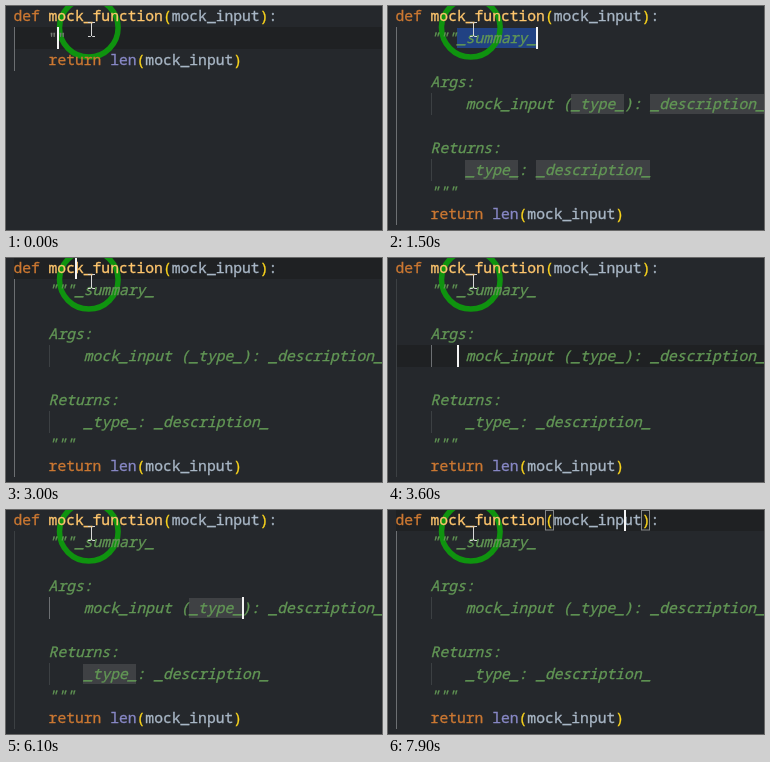
Write an HTML page that moves like this. It is 376 by 224 pixels and loops after 8 s.

```html
<!DOCTYPE html>
<html lang="en">
<head>
<meta charset="utf-8">
<title>Docstring editing</title>
<style>
  html, body { margin: 0; width: 100%; height: 100%; overflow: hidden; background: #25282c; }
  svg { display: block; width: 376px; height: 224px; }
  text { font: 14.667px "Noto Sans Mono", "DejaVu Sans Mono", monospace; white-space: pre; color: #a9b7c6; }
  text, tspan { fill: currentColor; stroke: currentColor; stroke-width: .3px; }
  .key { color: #cc7832; }
  .fn { color: #ffc66d; }
  .paren { color: #fad41c; }
  .builtin { color: #8888c6; }
  .doc { color: #629755; font-style: italic; }
  .quote { color: #747b72; }
  .guide { fill: #3c4043; }
  .guide.active { fill: #6c6f72; }
  .mark { fill: #7c7c7c; fill-opacity: .3; }
  .selected { fill: #214283; }
  .bracket { fill: none; stroke: #85888a; }
</style>
</head>
<body>
<svg id="stage" viewBox="0 0 376 224">
  <rect id="band" x="8" width="368" height="22" fill="#1f2123"/>
  <g id="marks"></g>
  <circle cx="82.8" cy="21.8" r="29.3" fill="none" stroke="#0f930f" stroke-width="5.5"/>
  <g id="header"></g>
  <g id="short"></g>
  <g id="full"></g>
  <text id="quotes" class="quote" x="42.6" y="36.5"></text>
  <g id="popup">
    <rect x="45.5" y="43.5" width="340" height="23" fill="#2b2d30" stroke="#45484b"/>
    <rect x="46" y="44" width="330" height="22" fill="#263a52"/>
    <path d="M52 50h10v10h-10z" fill="none" stroke="#a9b7c6" stroke-dasharray="2 1"/>
    <text x="69" y="59.5">Generate Docstring</text>
  </g>
  <rect id="caret" width="2" height="22" fill="#f4f4f4"/>
  <path d="M82 16.5h2.5l1 1 1-1H89M85.5 17v13M82 30.5h2.5l1-1 1 1H89" fill="none" stroke="#d8d8d8"/>
</svg>
<script>
const LOOP = 8000, LEFT = 7.4, CELL = 8.8, ROW = 22;
const $ = id => document.getElementById(id);
const xAt = col => LEFT + col * CELL;
const topAt = line => line * ROW - 1;

function add(parent, tag, attrs, content = '') {
  const node = document.createElementNS('http://www.w3.org/2000/svg', tag);
  for (const key in attrs) node.setAttribute(key, attrs[key]);
  node.textContent = content;
  parent.append(node);
  return node;
}

function write(parent, line, col, ...tokens) {
  const text = add(parent, 'text', { x: xAt(col), y: line * ROW + 14.5 });
  for (const [content, cls = ''] of tokens) add(text, 'tspan', { class: cls }, content);
}

const writeReturn = (parent, line) => write(parent, line, 4,
  ['return ', 'key'], ['len', 'builtin'], ['(', 'paren'], ['mock_input'], [')', 'paren']);

const guide = (parent, col, line, count) => add(parent, 'rect',
  { class: 'guide', x: Math.ceil(xAt(col)), y: topAt(line), width: 1, height: count * ROW });

function box(group, cls, line, col, length) {
  const inset = cls === 'bracket' ? .5 : 0;
  add(group, 'rect', {
    class: cls, x: Math.floor(xAt(col)) + inset, y: topAt(line) + inset + 1,
    width: Math.round(length * CELL) - inset * 2, height: ROW - 2 - inset
  });
}

write($('header'), 0, 0, ['def ', 'key'], ['mock_function', 'fn'], ['(', 'paren'],
  ['mock_input'], [')', 'paren'], [':']);

guide($('short'), 0, 1, 2).classList.add('active');
writeReturn($('short'), 2);

const full = $('full');
const bodyGuide = guide(full, 0, 1, 9);
const argsGuide = guide(full, 4, 4, 1);
guide(full, 4, 7, 1);
[
  [1, 4, '"""_summary_'], [3, 4, 'Args:'],
  [4, 8, 'mock_input (_type_): _description_'],
  [6, 4, 'Returns:'], [7, 8, '_type_: _description_'], [8, 4, '"""']
].forEach(([line, col, content]) => write(full, line, col, [content, 'doc']));
writeReturn(full, 9);

const [fields, words, brackets] = [0, 1, 2].map(() => add($('marks'), 'g', {}));
box(fields, 'selected', 1, 7, 9);
for (const [line, col, length] of [[4, 20, 6], [4, 29, 13], [7, 8, 6], [7, 16, 13]])
  box(fields, 'mark', line, col, length);
box(words, 'mark', 4, 20, 6);
box(words, 'mark', 7, 8, 6);
box(brackets, 'bracket', 0, 17, 1);
box(brackets, 'bracket', 0, 28, 1);

// Caret stops: time, line, column.
const stops = [
  [0, 1, 5], [200, 1, 6], [300, 1, 7], [900, 1, 0], [1000, 1, 16],
  [2400, 1, 7], [2500, 0, 7], [3200, 1, 7], [3300, 2, 0], [3400, 3, 7], [3500, 4, 7]
];
for (let col = 8; col <= 13; col++) stops.push([3400 + col * 100, 4, col]);
for (let col = 14; col <= 20; col++) stops.push([3700 + col * 100, 4, col]);
stops.push([6000, 4, 26], [6600, 3, 9], [7500, 2, 0], [7600, 1, 16], [7700, 0, 26]);

const show = (node, on) => node.setAttribute('visibility', on ? 'visible' : 'hidden');
const within = (t, from, to) => t >= from && t < to;
const start = performance.now();

function draw() {
  // A small lead keeps steps ahead of their nominal time.
  const t = (performance.now() - start) % LOOP + 20;
  const [, line, col] = stops.findLast(stop => stop[0] <= t);
  const filling = within(t, 1000, 2400), selecting = within(t, 6000, 6600);
  const inArgs = line === 3 || line === 4;

  $('band').setAttribute('y', topAt(line));
  show($('band'), !filling && !selecting);
  $('caret').setAttribute('x', Math.floor(xAt(col)));
  $('caret').setAttribute('y', topAt(line));
  show($('caret'), !within(t, 2000, 2200));
  $('quotes').textContent = t < 300 ? '""' : t < 900 ? '""""""' : '';
  show($('popup'), within(t, 300, 900));
  show($('short'), t < 1000);
  show(full, t >= 1000);
  argsGuide.classList.toggle('active', inArgs);
  bodyGuide.classList.toggle('active', !inArgs);
  show(fields, filling);
  show(words, selecting);
  show(brackets, t >= 7700);
  requestAnimationFrame(draw);
}
draw();
</script>
</body>
</html>
```
